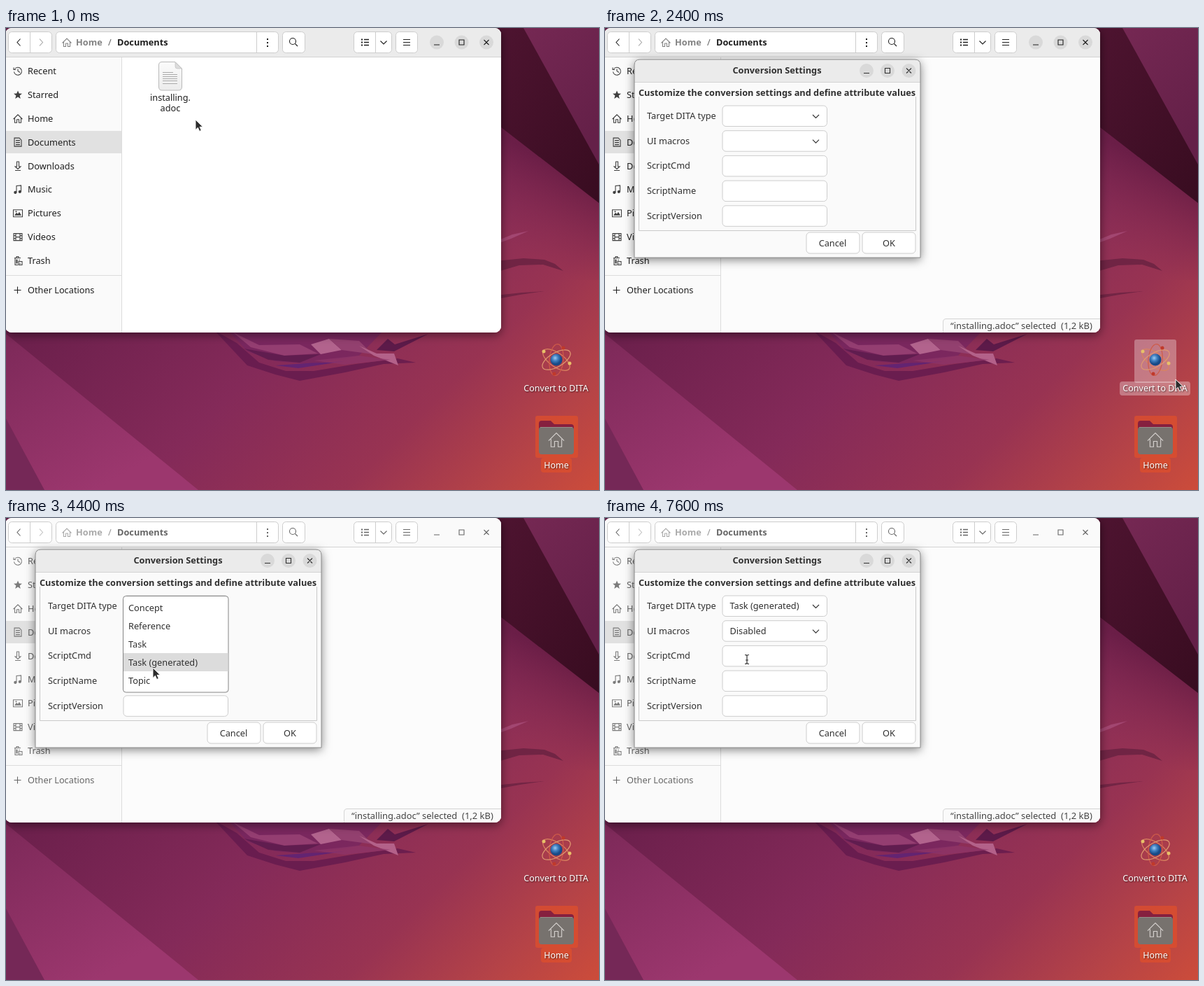
These frames come from a looping animation (848x660 px, 8 s). An HTML page:

```html
<!DOCTYPE html>
<html lang="en">
<head>
<meta charset="utf-8">
<title>Conversion settings</title>
<style>
html, body { margin: 0; width: 100%; height: 100%; overflow: hidden; background: #842a59; }
svg { display: block; width: 848px; height: 660px; font: 12.75px "Noto Sans", "Open Sans", sans-serif; }
text { fill: currentColor; white-space: pre; }
.mid { text-anchor: middle; }
.bold { font-weight: 700; }
.line { fill: none; stroke: currentColor; stroke-width: 1.1; vector-effect: non-scaling-stroke; }
.box { fill: #fff; stroke: #cdcdcd; }
.desk { fill: #fff; text-anchor: middle; font-size: 12.5px; text-shadow: 1px 1px 2px #0009; }
.bar { fill: #ebebeb; }
#files { color: #1f1f1f; }
#files.idle { color: #666; }
#files.idle .disc { opacity: 0; }
#files.idle .bar { fill: #fafafa; }
#status text { font-size: 12.95px; }
#dialog, .menu { color: #303030; }
</style>
</head>
<body>
<svg viewBox="0 0 848 660">
  <defs>
    <linearGradient id="wall" gradientUnits="userSpaceOnUse" x1="220" y1="220" x2="754" y2="754">
      <stop offset="0" stop-color="#6a1f4b"/><stop offset=".38" stop-color="#842a59"/>
      <stop offset=".66" stop-color="#983352"/><stop offset=".85" stop-color="#b54347"/>
      <stop offset="1" stop-color="#cc4c3a"/>
    </linearGradient>
    <linearGradient id="dusk" gradientUnits="userSpaceOnUse" x1="770" y1="190" x2="705" y2="300">
      <stop offset="0" stop-color="#5e1840" stop-opacity=".7"/><stop offset="1" stop-color="#7d2750" stop-opacity="0"/>
    </linearGradient>
    <linearGradient id="plum" gradientUnits="userSpaceOnUse" x1="0" y1="440" x2="130" y2="660">
      <stop offset="0" stop-color="#7d2959"/><stop offset="1" stop-color="#9c376e"/>
    </linearGradient>
    <linearGradient id="night" x2="1" y2="1">
      <stop offset="0" stop-color="#4f1431"/><stop offset="1" stop-color="#380c20"/>
    </linearGradient>
    <linearGradient id="dawn" x2=".6" y2="1">
      <stop offset="0" stop-color="#752853"/><stop offset="1" stop-color="#642048"/>
    </linearGradient>
    <linearGradient id="paper" x2="0" y2="1">
      <stop offset="0" stop-color="#fbfbfb"/><stop offset="1" stop-color="#ececec"/>
    </linearGradient>
    <radialGradient id="ball" cx=".4" cy=".35">
      <stop offset="0" stop-color="#9ccbf2"/><stop offset=".5" stop-color="#3f7fc0"/><stop offset="1" stop-color="#174a86"/>
    </radialGradient>
    <filter id="shade" x="-20%" y="-20%" width="140%" height="150%">
      <feDropShadow dx="0" dy="3" stdDeviation="7" flood-color="#000" flood-opacity=".5"/>
    </filter>
    <clipPath id="winClip"><rect x="-1" width="709" height="435" rx="9"/></clipPath>
    <path id="house" class="line" d="M-6.500 1 0-5.500 6.500 1M-4.500-.5V6H-1.500V1.500H1.500V6H4.500V-.5"/>
    <g id="doc">
      <path d="M223 48.500H242L251.500 58V84Q251.500 89 246.500 89H223Q218.500 89 218.500 84V53Q218.500 48.500 223 48.500Z" fill="url(#paper)" stroke="#b9b9b9"/>
      <path d="M242 49V55Q242 58 245 58H251Z" fill="#dcdcdc" stroke="#bbb" stroke-width=".6"/>
      <path d="M224 63.500H239M224 66.500H245M224 69.500H245M224 72.500H245M224 75.500H245M224 79.500H245" stroke="#aaa"/>
    </g>
  </defs>

  <g id="desktop"></g>
  <g id="files"></g>
  <g id="drag">
    <use href="#doc"/>
    <rect x="203" y="90" width="65" height="33" rx="4" fill="#e95420"/>
    <text class="mid" x="235" y="104" color="#fff">installing.</text>
    <text class="mid" x="235" y="118.500" color="#fff">adoc</text>
  </g>
  <g id="dialog"></g>
  <g id="typeMenu" class="menu"></g>
  <g id="macroMenu" class="menu"></g>
  <g id="pointer">
    <path id="arrow" d="M0 0V14.500L3.400 11.300 5.700 16.500 8.300 15.300 6 10.300H10.500Z" fill="#2b2b2b" stroke="#fff" stroke-width=".9"/>
    <path id="beam" d="M-3-6.500Q0-6.500 0-5Q0-6.500 3-6.500M0-5V5M-3 6.500Q0 6.500 0 5Q0 6.500 3 6.500M-2 1H2" fill="none" stroke="#333" stroke-width="1.200"/>
    <g id="hand">
      <path d="M0 5 2 2 5 0 9 1 12 4 12 8 10 12H4L2 9Z" fill="#262626" stroke="#eee" stroke-width=".7"/>
      <path d="M13 8V18M8 13H18" stroke="#fff" stroke-width="4"/>
      <path d="M13 9V17M9 13H17" stroke="#222" stroke-width="1.800"/>
    </g>
  </g>
</svg>
<script>
const $ = id => document.getElementById(id);
const rect = (x, y, w, h, attrs = '') => `<rect x="${x}" y="${y}" width="${w}" height="${h}" ${attrs}/>`;
const path = (d, attrs = 'class="line"') => `<path d="${d}" ${attrs}/>`;
const poly = (d, fill, opacity = 1) => path(`M${d}Z`, `fill="${fill}" opacity="${opacity}"`);
const text = (x, y, s, cls = '', attrs = '') => `<text x="${x}" y="${y}" class="${cls}" ${attrs}>${s}</text>`;
const house = (x, y, scale = 1) => `<use href="#house" transform="translate(${x} ${y}) scale(${scale})"/>`;
const field = (x, y, w, h, attrs = '') => rect(x + .5, y + .5, w, h, `rx="5" class="box" ${attrs}`);
const chevron = (x, y) => path(`M${x - 4.500} ${y - 2}l4.500 4.500 4.500-4.500`);

function windowButtons(xs, y) {
  const [min, max, close] = xs;
  return xs.map(x => `<circle class="disc" cx="${x}" cy="${y}" r="10" fill="#d9d9d9"/>`).join('') +
    path(`M${min - 4} ${y + 3.500}h8M${max - 3.500} ${y - 3.500}h7v7h-7ZM${close - 3.500} ${y - 3.500}l7 7m0-7l-7 7`);
}

function desktop() {
  const orbit = (angle, color) =>
    `<ellipse cx="787" cy="474" rx="22.500" ry="10" transform="rotate(${angle} 787 474)" fill="none" stroke="${color}" stroke-width="1.200"/>`;
  const electron = (x, y, color) => `<circle cx="${x}" cy="${y}" r="2.500" fill="${color}"/>`;
  const glow = (id, fill) =>
    `<g id="${id}" fill="${fill}">${rect(757, 445, 60, 62, 'rx="3"')}${rect(736, 505, 101, 20, 'rx="4"')}</g>`;
  return rect(0, 0, 848, 660, 'fill="url(#wall)"') +
    rect(690, 130, 158, 230, 'fill="url(#dusk)"') +
    poly('0 437 275 660H0', 'url(#plum)') +
    poly('0 558 55 660H0', '#752857') +
    poly('690 0H848V250L690 128', 'url(#night)') +
    poly('740 0H848V195', 'url(#dawn)') +
    // folded fins beside and under the window
    poly('700 305 724 295 747 290 722 301 700 309', '#a84d78', .8) +
    poly('700 333 740 329 770 331 785 337 797 347 768 338 734 339 700 349', '#64203f', .75) +
    poly('700 382 738 378 770 376 735 381 708 386', '#64203f', .7) +
    poly('298 432 330 450 362 478 400 490 440 490 500 480 560 472 586 478 540 480 485 492 420 504 385 495 345 482', '#61184c', .75) +
    poly('318 432 345 462 385 476 435 480 505 468 540 432', '#762660', .75) +
    poly('325 435 362 453 420 452 446 465 398 468 350 456', '#a34b7c', .65) +
    poly('340 458 398 468 450 466 420 478 375 474', '#541747', .65) +
    poly('436 452 462 444 480 460 450 466', '#b2638d') +
    poly('462 444 505 447 524 466 480 460', '#93406f') +
    poly('505 454 530 465 555 465 561 482 526 468', '#b36189') +
    poly('530 460 546 444 556 452 604 437 555 462', '#541747', .85) +
    poly('385 482 430 479 484 476 418 486', '#5b2279', .8) +
    poly('440 475 505 468 550 474 484 481', '#8d356a', .7) +
    glow('hot', '#e95420b0') + glow('warm', '#ffffff50') +
    orbit(35, '#d9835f') + orbit(95, '#cf5b49') + orbit(-30, '#e09a70') +
    '<circle cx="787" cy="474" r="8.500" fill="url(#ball)"/>' +
    electron(769, 462, '#e8c069') + electron(797, 457, '#c0392b') +
    electron(806, 479, '#e8c069') + electron(784, 494, '#c0392b') +
    text(786.500, 519, 'Convert to DITA', 'desk') +
    rect(757, 554, 61, 60, 'rx="3" fill="#de4f2dc0"') + rect(765, 614, 44, 21, 'rx="4" fill="#de4f2dc0"') +
    path('M762 600V565Q762 561 766 561H779L784 566H808Q812 566 812 570V600Z', 'fill="#86203f"') +
    rect(762, 570, 50, 39, 'rx="4" fill="#77726e"') +
    path('M764 570.500H810', 'stroke="#978f89"') +
    `<g color="#d6d2cf">${house(787, 588, 1.700)}</g>` +
    text(787, 628.500, 'Home', 'desk') +
    '<rect id="cell" x="727.500" width="121" height="109.500" fill="#6f8cc080" stroke="#7f9dcc" stroke-opacity=".8"/>';
}

function files() {
  const places = ['Recent', 'Starred', 'Home', 'Documents', 'Downloads', 'Music', 'Pictures', 'Videos', 'Trash'];
  const icons = [
    path('M-4.500-3A5.500 5.500 0 1 1-5.500 1M-6-5V-2H-3M0-3V0L3 2'),
    path('M0-6 1.700-1.900 6-1.700 2.600 1.100 3.800 5.500 0 3-3.800 5.500-2.600 1.100-6-1.700-1.700-1.900Z', 'fill="currentColor"'),
    house(0, 0),
    path('M-5-6H2L5-3V6H-5ZM-3-2.500H3M-3 .500H3M-3 3.500H3'),
    path('M-1.500-6H1.500V1H4L0 4.500-4 1H-1.500ZM-4 6.500H4'),
    path('M-2 4V-5.500L4.500-6V3') + '<circle cx="-3.700" cy="4" r="2.100" fill="currentColor"/><circle cx="2.800" cy="3" r="2.100" fill="currentColor"/>',
    path('M-6.500-5H6.500V5H-6.500Z') + path('M-5 3-2-1 0 1 2-2 5 3Z', 'fill="currentColor"') + '<circle cx="-2.500" cy="-2.500" r="1" fill="currentColor"/>',
    path('M-6-5H6V5H-6ZM-3-5V5M3-5V5M-3 0H3M-6-2H-3M-6 2H-3M3-2H6M3 2H6'),
    path('M-5-4H4M-2-4V-6H1V-4M-4-4V6H0M-1-2V4M-2-2V4M2-2V0M1 1H6V6H1ZM3 3V5'),
  ];
  const rows = places.map((name, i) => {
    const y = 61.500 + i * 33.880;
    return `<g transform="translate(17 ${y})" opacity=".85">${icons[i]}</g>` + text(31, y + 4.500, name);
  }).join('');
  const header =
    rect(-1, 0, 709, 41, 'class="bar"') + path('M0 41.500H708', 'stroke="#d3d3d3"') +
    field(3, 5, 62, 30) + field(71, 5, 318, 30) + field(395, 5, 32, 30) + field(497, 5, 54, 30) + field(557, 5, 31, 30) +
    path('M34.500 6V35M358.500 6V35M528.500 6V35', 'stroke="#cdcdcd"') +
    path('M20.500 15.500 16 20.500 20.500 25.500') +
    `<g opacity=".4">${path('M48 15.500 52.500 20.500 48 25.500')}</g>` +
    `<g opacity=".55">${house(87, 20.500)}${text(100, 25, 'Home', 'bold')}</g>` +
    text(146, 25, '/', '', 'opacity=".7"') + text(159, 25, 'Documents', 'bold') +
    path('M374 15v2m0 3v2m0 3v2', 'stroke="currentColor" stroke-width="2"') +
    '<circle class="line" cx="410" cy="19" r="4.500"/>' + path('M413.500 22.500 417 26') +
    path('M508 16.500h2m0 4h-2m0 4h2', 'stroke="currentColor" stroke-width="2"') +
    path('M512 16.500h7m0 4h-7m0 4h7', 'stroke="currentColor" stroke-width="1.300"') + chevron(540, 20.500) +
    path('M568 16.500h10M568 20.500h10M568 24.500h10') + windowButtons([616, 651.500, 687], 20.500);
  return rect(-1, 0, 709, 435, 'rx="9" fill="#fff" filter="url(#shade)"') +
    '<g clip-path="url(#winClip)">' +
    rect(165, 41, 543, 394, 'id="pane"') + rect(-1, 41, 166, 394, 'fill="#fafafa"') +
    rect(-1, 147, 166, 32, 'fill="#e1e1e1"') + path('M165.500 42V435M0 353.500H165', 'stroke="#dcdcdc"') +
    header + rows + path('M11.500 374.500H21.500M16.500 369.500V379.500') + text(31, 379, 'Other Locations') +
    '<use href="#doc"/>' + rect(203, 90, 65, 33, 'id="picked" rx="4" fill="#e95420"') +
    `<g id="fileName">${text(235, 104, 'installing.', 'mid')}${text(235, 118.500, 'adoc', 'mid')}</g>` +
    '<g id="status" color="#444">' + path('M483.500 436V420Q483.500 415.500 488 415.500H709V436', 'fill="#fafafa" stroke="#d5d5d5"') +
    text(494, 430, '“installing.adoc” selected  (1,2 kB)') + '</g></g>';
}

const labels = ['Target DITA type', 'UI macros', 'ScriptCmd', 'ScriptName', 'ScriptVersion'];
const rowY = i => 110.500 + i * 35.700;

function dialog() {
  const rows = labels.map((name, i) => {
    const y = rowY(i), combo = i < 2;
    return text(60, y + 19.500, name) + field(167.500, y, 149.500, 29.500, combo ? `id="combo${i}"` : '') +
      (combo ? text(178.500, y + 19.500, '', '', `id="value${i}"`) + chevron(301.500, y + 15.500) : '');
  }).join('');
  const outline = 'M42 328V53Q42 45 50 45H443Q451 45 451 53V328Z';
  return path(outline, 'fill="#fafafa" filter="url(#shade)"') +
    path('M42 77V53Q42 45 50 45H443Q451 45 451 53V77Z', 'fill="#ebebeb"') +
    path('M42 77.500H451', 'stroke="#d3d3d3"') + path(outline, 'fill="none" stroke="#8c8c8c"') +
    text(246, 65, 'Conversion Settings', 'bold mid') + windowButtons([374, 404, 434.500], 61) +
    path('M48.500 98V289.500H444.500V98', 'fill="none" stroke="#c9c9c9"') +
    text(48, 96.500, 'Customize the conversion settings and define attribute values', 'bold') + rows +
    field(287.500, 291.500, 76, 30) + field(367.500, 291.500, 76, 30) +
    text(325.500, 311.500, 'Cancel', 'mid') + text(406, 311.500, 'OK', 'mid');
}

function menu(id, top, items) {
  $(id).innerHTML = rect(167.500, top + .5, 150.500, items.length * 26 + 7.500, 'rx="4" fill="#fff" stroke="#858585"') +
    rect(168, top, 149.500, 26, 'class="row" fill="#dcdcdc"') +
    items.map((s, i) => text(175, top + 21.500 + i * 26, s)).join('');
  return { node: $(id), row: $(id).querySelector('.row'), top, count: items.length };
}

$('desktop').innerHTML = desktop();
$('files').innerHTML = files();
$('dialog').innerHTML = dialog();
const typeMenu = menu('typeMenu', 111, ['Concept', 'Reference', 'Task', 'Task (generated)', 'Topic']);
const macroMenu = menu('macroMenu', 147, ['Enabled', 'Disabled']);

const grab = [247, 84];
const track = [
  [0, 271, 131], [300, ...grab], [500, ...grab], [1300, 808, 476], [1400, 811, 477],
  [1700, 814, 534], [2300, 814, 534], [2400, 816, 502], [3200, 313, 150], [3700, 292, 126],
  [4100, 292, 126], [4400, 210, 214], [4800, 210, 214], [5700, 238, 166], [6100, 234, 163],
  [6200, 231, 160], [6500, 222, 186], [7000, 222, 186], [7600, 203, 202], [8000, 203, 202],
];

function pointerAt(t) {
  const i = track.findIndex(key => key[0] > t);
  const [t0, x0, y0] = track[i - 1], [t1, x1, y1] = track[i];
  const p = (t - t0) / (t1 - t0), e = p * p * (3 - 2 * p);
  return [x0 + (x1 - x0) * e, y0 + (y1 - y0) * e];
}

const show = (node, on) => { node.style.display = on ? '' : 'none'; };
const move = (node, x, y) => node.setAttribute('transform', `translate(${x} ${y})`);

function showMenu(m, on, y) {
  show(m.node, on);
  const index = Math.max(0, Math.min(m.count - 1, Math.floor((y - m.top - 4) / 26)));
  m.row.setAttribute('y', m.top + 4 + index * 26);
}

function draw(t) {
  const within = (a, b) => t >= a && t < b;
  const [x, y] = pointerAt(t);
  const dragging = within(600, 2000), selected = t >= 500, open = t >= 2400;
  const typeOpen = within(3800, 4900), macroOpen = within(5900, 7100);

  show($('picked'), selected);
  show($('status'), selected);
  $('fileName').style.color = selected ? '#fff' : '';
  $('files').setAttribute('class', t >= 2500 ? 'idle' : '');
  $('pane').setAttribute('fill', open ? '#fcfcfc' : '#fff');

  show($('hot'), within(1400, 2000));
  show($('warm'), within(2000, 2500));
  show($('cell'), within(1300, 2000));
  $('cell').setAttribute('y', t < 1400 ? 330.5 : 441);
  show($('drag'), dragging);
  move($('drag'), x - grab[0], y - grab[1]);

  show($('dialog'), open);
  $('value0').textContent = t >= 4900 ? 'Task (generated)' : '';
  $('value1').textContent = t >= 7100 ? 'Disabled' : '';
  const overRow = i => open && x > 168 && x < 318 && y > rowY(i) && y < rowY(i) + 30;
  const free = !typeOpen && !macroOpen;
  [0, 1].forEach(i => { $('combo' + i).style.fill = free && overRow(i) ? '#f3f5f4' : '#fff'; });
  showMenu(typeMenu, typeOpen, y);
  showMenu(macroMenu, macroOpen, y);

  const typing = free && [2, 3, 4].some(overRow);
  show($('hand'), dragging);
  show($('beam'), typing);
  show($('arrow'), !dragging && !typing);
  move($('pointer'), x, y);
}

const start = performance.now();
function tick() {
  const t = (performance.now() - start) % 8000;
  draw(Math.floor(t / 100) * 100);
  requestAnimationFrame(tick);
}
tick();
</script>
</body>
</html>
```
